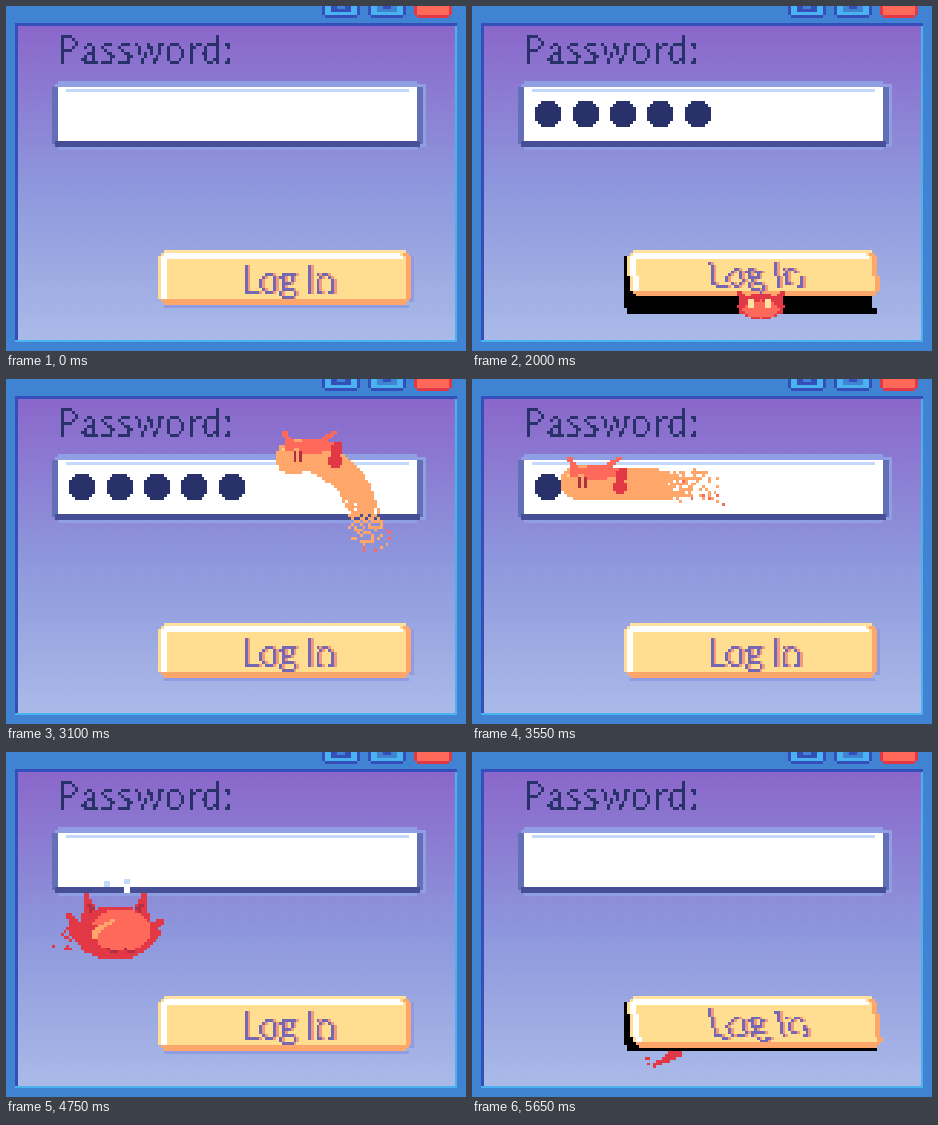
Write an HTML page with a canvas that moves like this. It is 460 by 345 pixels and loops after 5.68 s.

```html
<!DOCTYPE html>
<html lang="en">
<head>
<meta charset="utf-8">
<title>Password</title>
<style>
  html, body { margin: 0; width: 100%; height: 100%; overflow: hidden; background: #4083d3; }
  canvas { display: block; width: 100%; height: 100%; image-rendering: pixelated; }
</style>
</head>
<body>
<canvas id="stage" width="160" height="120"></canvas>
<script>
const W = 160, H = 120, LOOP = 5680;
const ctx = document.getElementById('stage').getContext('2d');
const INK = '#29316b', ORANGE = '#ffa66b', CORAL = '#ff6959', RED = '#e23846', WINE = '#b02f45';
const BLUE = '#4083d3', NAVY = '#344fb9', CYAN = '#4ab3ef', LILAC = '#909ee4';

// The creature's route: time, x, y
const ROUTE = [
  [2200, 116, 86], [2500, 125, 59], [2650, 123, 43], [2800, 118, 34], [2950, 108, 27],
  [3100, 99, 27], [3250, 79, 36], [3650, 27, 36], [3750, 43, 46], [3850, 54, 28],
  [4000, 42, 17], [4300, 36, 27], [4750, 37.5, 62.5], [4900, 40, 84], [5350, 68, 104]
];
const BODY = 42;

function rect(c, x, y, w, h) { ctx.fillStyle = c; ctx.fillRect(x, y, w, h); }
function dot(x, y) { ctx.fillRect(Math.round(x), Math.round(y), 1, 1); }
function rand(a, b) { const s = Math.sin(a * 12.99 + b * 78.23) * 43758.55; return s - Math.floor(s); }

function disc(c, cx, cy, rx, ry = rx, keep = () => true) {
  ctx.fillStyle = c;
  for (let y = Math.floor(cy - ry); y <= cy + ry; y++)
    for (let x = Math.floor(cx - rx); x <= cx + rx; x++)
      if (((x - cx) / rx) ** 2 + ((y - cy) / ry) ** 2 <= 1 && keep(x, y)) dot(x, y);
}

// Curved spike from a base of radius r to a tip at (dx, dy)
function horn(c, x, y, dx, dy, r) {
  for (let k = 0; k <= 1; k += .1) disc(c, x + dx * k * k, y + dy * k, .7 + r * (1 - k));
}

function sparks(c, n, seed, x, y, w, h) {
  ctx.fillStyle = c;
  for (let i = 0; i < n; i++) dot(x + (rand(i, seed) - .5) * w, y + (rand(seed, i) - .5) * h);
}

// Thin one-bit text: keep only the ridge of each stroke
function textPixels(str, x, y, spacing) {
  const c = document.createElement('canvas');
  c.width = W; c.height = H;
  const g = c.getContext('2d');
  g.font = '12.4px Lato, sans-serif';
  g.letterSpacing = spacing + 'px';
  g.fillText(str, x, y);
  const data = g.getImageData(0, 0, W, H).data, out = [];
  const a = i => data[i * 4 + 3];
  for (let i = W; i < W * (H - 1); i++) {
    const across = a(i) >= a(i - 1) && a(i) > a(i + 1);
    const down = a(i) >= a(i - W) && a(i) > a(i + W);
    if (a(i) > 190 || (a(i) > 85 && (across || down))) out.push([i % W, Math.floor(i / W)]);
  }
  return out;
}
const title = textPixels('Password:', 18, 20, .7);
const label = textPixels('Log In', 82, 100, -.1);

const sky = ctx.createLinearGradient(0, 7, 0, 116);
sky.addColorStop(0, '#8a67ca');
sky.addColorStop(.5, '#8d96dc');
sky.addColorStop(1, '#a9bae8');

function windowButton(x, edge, rim, fill) {
  rect(edge, x, 0, 13, 3);
  rect(edge, x + 1, 3, 11, 1);
  rect(rim, x + 1, 0, 11, 3);
  rect(fill, x + 3, 0, 7, 2);
}

function scene() {
  rect(BLUE, 0, 0, W, H);
  rect(NAVY, 3, 6, 154, 111);
  rect(CYAN, 156, 7, 1, 110);
  rect(CYAN, 3, 116, 154, 1);
  rect(sky, 4, 7, 152, 109);
  windowButton(110, NAVY, CYAN, NAVY);
  rect(BLUE, 115, 0, 3, 1);
  windowButton(126, NAVY, CYAN, BLUE);
  rect(NAVY, 131, 0, 3, 1);
  windowButton(142, RED, CORAL, CORAL);
  ctx.fillStyle = INK;
  title.forEach(p => dot(...p));
}

function field(dots, cursor) {
  rect(LILAC, 18, 26, 125, 24);
  rect(LILAC, 17, 27, 129, 22);
  rect('#6370b8', 16, 28, 129, 20);
  rect('#464e96', 17, 47, 127, 2);
  rect('#fff', 18, 28, 125, 19);
  rect('#c3d8fa', 21, 29, 119, 1);
  for (let i = 0; i < dots; i++) disc(INK, 26 + 13 * i, 37, 4.5);
  if (cursor >= 0) rect(INK, 22 + 13 * cursor, 30, 1, 15);
}

function button(lift, skew, drop) {
  const h = 18 - Math.round(lift), bent = lift > 0;
  if (bent) {
    rect('#000', 53, 87, 86, 15 + drop);
    rect('#000', 54, 102 + drop, 87, 2);
  } else {
    rect('#8f9ce2', 140, 87, 2, 16);
    rect('#8f9ce2', 55, 104, 85, 1);
  }
  for (let i = 0; i <= h; i++) {
    const inset = Math.max(0, 2 - i, 2 - h + i), y = 85 + i;
    const x = 53 + inset + bent + Math.round(skew * (i / h) ** 1.3), w = 88 - 2 * inset - bent;
    const edge = i === 0 ? '#ffe2a0' : i >= h - 1 ? ORANGE : '#ffdd91';
    rect(edge, x, y, w, 1);
    if (i === 0 || i >= h - 1) continue;
    rect('#fff', x + 1, y, i < 3 ? w - 4 : 2, 1);
    rect(ORANGE, x + w - 2, y, 2, 1);
  }
  const spots = label.map(([x, y]) => [
    82 + (x - 82) * (1 + skew * skew * .018) + skew * (y - 95) / 8,
    95 + (y - 95) * (1 - lift * .05) - lift * .6 + (bent ? Math.sin(x * .45) * .6 : 0)
  ]);
  ctx.fillStyle = '#f09a80';
  spots.forEach(([x, y]) => dot(x + 1, y));
  ctx.fillStyle = '#7567b1';
  spots.forEach(p => dot(...p));
}

function peek(blink) {
  disc(RED, 100, 104, 8, 4.5);
  disc(CORAL, 100, 105, 6, 3);
  for (const side of [-1, 1]) {
    horn(RED, 100 + side * 6, 102, side * 2, -3, 1);
    rect(blink ? WINE : '#ffe0a0', 99 + side * 3, blink ? 104 : 102, 2, blink ? 1 : 3);
  }
}

// Smooth position on the route
function at(t) {
  const last = ROUTE.length - 1;
  let i = 0;
  while (i < last - 1 && t >= ROUTE[i + 1][0]) i++;
  const [a, b, c, d] = [i - 1, i, i + 1, i + 2].map(n => ROUTE[Math.min(last, Math.max(0, n))]);
  const k = Math.min(1, (t - b[0]) / (c[0] - b[0]));
  return [1, 2].map(n => b[n] + .5 * k * (c[n] - a[n] +
    k * (2 * a[n] - 5 * b[n] + 4 * c[n] - d[n] + k * (3 * (b[n] - c[n]) + d[n] - a[n]))));
}

// The body follows the head along the route for a fixed length
function trail(t) {
  const pts = [];
  let length = 0, prev = at(t);
  for (let s = t; s >= 2200 && length < BODY; s -= 8) {
    const p = at(s);
    length += Math.hypot(p[0] - prev[0], p[1] - prev[1]);
    pts.push([...p, length]);
    prev = p;
  }
  return pts.map(([x, y, l]) => [x, y, l / length || 0]).reverse();
}

function serpent(t) {
  const front = t < 2800, pts = trail(t), [hx, hy] = at(t).map(Math.round);
  for (const [x, y, u] of pts) {
    const r = front ? 8.5 * (1 - .6 * u) : 5.8 - u * .6, fade = (u - .6) / .45;
    disc(ORANGE, x, y, r, r, (px, py) => rand(px, py + t) > fade);
  }
  const [tx, ty] = pts[0];
  sparks(ORANGE, 14, t, tx, ty + 2, 14, 9);
  sparks(CORAL, 6, t + 1, tx, ty + 3, 16, 10);

  const cx = hx + (front ? 0 : 5);
  if (front) {
    rect(RED, hx - 6, hy - 7, 13, 2);
    disc(CORAL, hx - 4, hy + 5, 4.6, 4);
    horn(RED, hx - 9, hy + 1, -3, -4, 1.3);
  } else {
    disc(CORAL, cx + 2, hy - 4, 8, 2.2);
    disc(ORANGE, hx, hy, 4, 3.5);
    horn(RED, cx + 10, hy - 3, 2, -2, 1);
  }
  rect('#ffd080', hx - 3, hy - 3, 3, 1);
  horn(CORAL, cx - 6, hy - 4, -2, -5, 1.2);
  horn(CORAL, cx + 6, hy - 5, front ? 0 : 4, -4, 1.2);
  horn(RED, cx + 10, hy + 1, 2, -5, 1.6);
  for (const eye of [1, 3]) rect(WINE, hx + eye, hy - (front ? 5 : 2), 1, 4);
}

function ball(t) {
  const [x, y] = at(t), rx = 13.5, ry = 9.5;
  for (const side of [-1, 1]) {
    horn(RED, x + side * 9, y - 6, side, -8, 2);
    horn(WINE, x + side * 8, y - 6, side, -4, .8);
    horn(RED, x + side * 13, y, side * 4, side < 0 ? -7 : -5, 2);
  }
  disc(RED, x, y, rx, ry);
  disc(CORAL, x + 2, y - 1, rx - 3, ry - 2);
  horn(RED, x - 9, y + 4, 3, -7, 2.5);
  horn(ORANGE, x - 7, y + 1, 8, -6, .6);
  for (const eye of [-1, 5]) {
    rect(WINE, Math.round(x) + eye - 2, Math.round(y) + 5, 1, 1);
    rect(WINE, Math.round(x) + eye - 1, Math.round(y) + 6, 3, 1);
  }
  sparks(RED, 14, t, x - rx - 4, y + 2, 8, 7);
  if (t === 4600 || t === 4750) for (let i = 0; i < 5; i++)
    rect(i % 2 ? '#fff' : '#c3d8fa', 32 + Math.floor(rand(i, 2) * 12), 44 + Math.floor(rand(i, 5) * 4), 2, 2);
}

function draw(t) {
  let dots = 0, cursor = -1;
  if (t >= 800 && t < 1200) cursor = dots = t / 100 - 6;
  else if (t >= 1200 && t < 3250) dots = 5;
  else if (t >= 3250 && t < 3750) dots = Math.floor((3650 - t) / 100);
  else if (t === 3750 || (t >= 4000 && (t - 4000) % 300 === 0)) cursor = 0;
  const peeking = t >= 1550 && t < 2200;
  const swing = t >= 2200 && t < 2800 ? 4 * Math.sin(Math.PI * (t - 2050) / 750) : t >= 5200 ? 2 : 0;

  scene();
  field(dots, cursor);
  if (t >= 2350 && t < 2650) serpent(t);
  if (t >= 4450 && t < 5500) ball(t);
  if (t >= 5500) {
    horn(RED, 71, 102, -8, 6, 2 + (5650 - t) / 150);
    sparks(RED, 4, t, 62, 108, 5, 5);
  }
  button(peeking ? 3 : swing * .6, peeking ? 1 : swing, peeking ? 3 : 0);
  if (peeking) peek(t === 1900);
  if (t >= 2650 && t < 4450) serpent(t);
}

// Moments at which the picture advances
const steps = [];
function run(from, to, gap) { for (let t = from; t <= to; t += gap) steps.push(t); }
run(0, 0, 1);
run(800, 1200, 100);
run(1550, 1900, 350);
run(2000, 2000, 1);
run(2200, 3250, 150);
run(3350, 3750, 100);
run(3850, 5650, 150);

let shown = -1;
function tick(now) {
  const t = now % LOOP;
  const step = steps.filter(s => s <= t).pop() || 0;
  if (step !== shown) draw(shown = step);
  requestAnimationFrame(tick);
}
tick(0);
</script>
</body>
</html>
```
